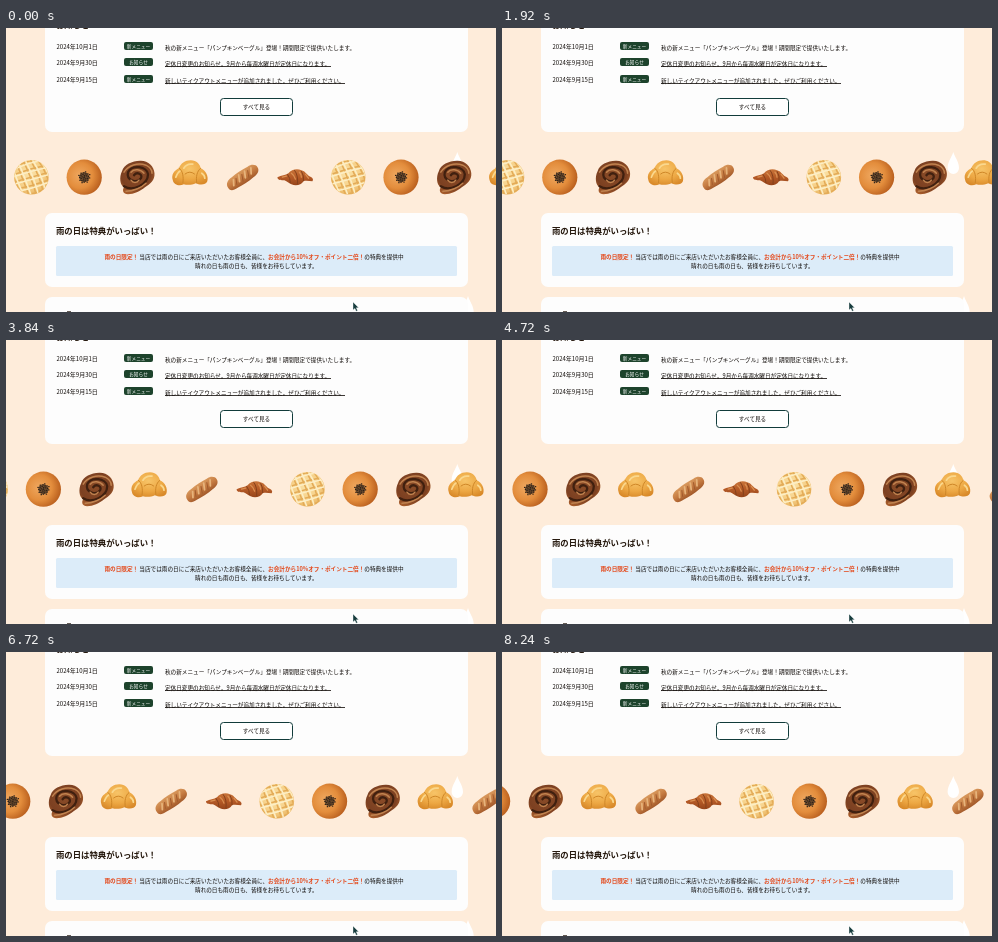
Recreate the animation shown at these times as an HTML page. Size 490 by 284 pixels, loop 8320 ms.

```html
<!DOCTYPE html>
<html lang="ja">
<head>
<meta charset="utf-8">
<title>Bakery</title>
<style>
html, body { margin: 0; width: 100%; height: 100%; overflow: hidden; background: #feecda; }
svg { display: block; width: 490px; height: 284px; }
text { font: 500 5.62px "Noto Sans CJK JP", "Noto Sans CJK", "Noto Sans", sans-serif; fill: #0d0805; white-space: pre; }
.date { font-size: 6px; }
.badge { font-size: 4.7px; fill: #fff; text-anchor: middle; }
.mid { text-anchor: middle; }
.title { font-size: 8.4px; font-weight: 700; fill: #24170c; }
.hot { fill: #e4481a; font-weight: 700; }
.card { fill: #fdfdfd; }
</style>
</head>
<body>
<svg viewBox="0 0 490 284">
  <defs>
    <radialGradient id="melonFill" cx=".45" cy=".4" r=".62">
      <stop offset="0" stop-color="#fbe3a8"/><stop offset=".65" stop-color="#f6d088"/><stop offset="1" stop-color="#e9b35f"/>
    </radialGradient>
    <radialGradient id="bunFill" cx=".38" cy=".45" r=".66">
      <stop offset="0" stop-color="#efa860"/><stop offset=".55" stop-color="#e38d3c"/><stop offset="1" stop-color="#b4591a"/>
    </radialGradient>
    <radialGradient id="rollFill" cx=".45" cy=".4" r=".62">
      <stop offset="0" stop-color="#8a4c28"/><stop offset=".7" stop-color="#7c4021"/><stop offset="1" stop-color="#a65c2b"/>
    </radialGradient>
    <radialGradient id="creamFill" cx=".48" cy=".35" r=".68">
      <stop offset="0" stop-color="#f7c468"/><stop offset=".6" stop-color="#eda844"/><stop offset="1" stop-color="#d98a2a"/>
    </radialGradient>
    <linearGradient id="loafFill" x2="0" y2="1">
      <stop offset="0" stop-color="#d99a5e"/><stop offset=".5" stop-color="#c67c42"/><stop offset="1" stop-color="#a2592a"/>
    </linearGradient>
    <linearGradient id="crustFill" x2="0" y2="1">
      <stop offset="0" stop-color="#c8743a"/><stop offset=".5" stop-color="#b55a26"/><stop offset="1" stop-color="#96451b"/>
    </linearGradient>
    <clipPath id="melonClip"><circle r="17"/></clipPath>
    <path id="drop" d="M0-11C1.5-6 5.7-1 5.7 5A5.7 6 0 0 1-5.7 5C-5.7-1-1.5-6 0-11Z" fill="#fff"/>

    <g id="bread0">
      <circle r="17.3" fill="url(#melonFill)"/>
      <g clip-path="url(#melonClip)" fill="none">
        <path id="melonLines" stroke="#e3ab57" stroke-width="1.5"/>
        <path id="melonShine" stroke="#fdeec4" stroke-width="1.6"/>
      </g>
    </g>
    <g id="bread1">
      <circle r="17.6" fill="url(#bunFill)"/>
      <circle r="5" fill="#6b4a2c"/>
      <path id="seeds" stroke="#2b2018" stroke-width="1.2" stroke-linecap="round"/>
    </g>
    <g id="bread2">
      <path d="M-15-6C-13-13-5-16 3-16.5C11-17 17-11 17.5-4C18 3 13 7 8 10C3 14-3 17-9 17C-14 17-15 13-13 10C-17 8-18 0-15-6Z" fill="url(#rollFill)"/>
      <g fill="none" stroke-linecap="round">
        <path d="M-13 9C-4 15 11 7 11-3C10-11-5-13-9-5C-11 3 0 7 4 1C6-3 0-6-3-2" stroke="#40200f" stroke-width="2.3"/>
        <path d="M-13-5C-9-12 1-15 9-12C13-10 15-7 15-4M-11 14C-3 14 5 10 9 6M-6-5C-3-9 4-8 7-4M-6 3C-4 6 0 6 2 3" stroke="#c1834f" stroke-width="1.5"/>
      </g>
    </g>
    <g id="bread3" transform="translate(0 -4)">
      <path d="M-17 7C-19 1-15-3-11-5C-9-10-5-13 1-13C7-13 10-9 11-5C16-3 19 3 17.5 8C16 12 10 12 6 10C2 12-3 12-6 11C-10 13-16 12-17 7Z" fill="url(#creamFill)"/>
      <path d="M-11-5C-7-3-6 4-7 10M11-5C7-2 6 4 7 10M-5 1Q0-3 5 1" fill="none" stroke="#cf8728" stroke-width="1"/>
      <path d="M-14 4Q-12-1-10-2M-6-5Q-3-10 3-9M12 0Q15 2 15 5" fill="none" stroke="#fad88e" stroke-width="1.7" stroke-linecap="round"/>
    </g>
    <g id="bread4" transform="rotate(-34)">
      <path d="M-18 1C-18-4-14-6-9-6C-3-7 4-6.5 10-6C15-6 18-3 18 0C18 4 14 6 9 6C3 7-4 6.5-10 6C-15 6-18 5-18 1Z" fill="url(#loafFill)"/>
      <path d="M-12 2L-9-3M-5 2L-2-4M2 2L5-4M9 2L12-3" stroke="#e6b37b" stroke-width="1.8" stroke-linecap="round"/>
      <path d="M-9 3L-6-3M-2 4L1-3M5 4L8-3" stroke="#a05a2c" stroke-width="1"/>
    </g>
    <g id="bread5">
      <path d="M-18 0C-14-2-10-2-7-4C-4-8 2-9 6-7C10-6 11-3 14-1C17 0 18.5 2 17 4C14 4 11 3 8 4C6 8 0 9-4 7C-7 6-8 4-11 3C-14 3-18 3-18 0Z" fill="url(#crustFill)"/>
      <path d="M-8-3Q-5 1-5 6M-1-7Q3-2 2 7M6-6Q9-1 8 4" fill="none" stroke="#84401b" stroke-width="1"/>
      <path d="M-13 0L-9-1M-4-4Q-1-2 0 2M4-5Q6-3 6 0M10-3L13 1" fill="none" stroke="#d98f52" stroke-width="1.3" stroke-linecap="round"/>
    </g>
  </defs>

  <rect width="490" height="284" fill="#feecda"/>
  <use href="#drop" x="451.3" y="135"/>
  <use href="#drop" x="462" y="279"/>

  <rect class="card" x="39" y="-20" width="423" height="124" rx="7"/>
  <text class="title" x="50" y="-.4">お知らせ</text>
  <g id="news"></g>
  <rect x="214.5" y="70.5" width="72" height="17" rx="3" fill="#fff" stroke="#123c3b"/>
  <text class="mid" x="250.5" y="80.8">すべて見る</text>

  <g id="belt"></g>

  <rect class="card" x="39" y="185" width="423" height="74" rx="7"/>
  <text class="title" x="50" y="206">雨の日は特典がいっぱい！</text>
  <rect x="50" y="218" width="401" height="30" rx="1.5" fill="#dcecf9"/>
  <text class="mid" x="248" y="230.5"><tspan class="hot">雨の日限定！</tspan> 当店では雨の日にご来店いただいたお客様全員に、<tspan class="hot">お会計から10%オフ・ポイント二倍！</tspan>の特典を提供中</text>
  <text class="mid" x="250.3" y="240.4">晴れの日も雨の日も、皆様をお待ちしています。</text>

  <rect class="card" x="39" y="269" width="423" height="40" rx="7"/>
  <path d="M61 283.6h4" stroke="#2d2016" stroke-width=".8"/>
  <path d="M347 274V282L348.9 280.4L350.2 283.3L351.6 282.7L350.3 279.8H352.7Z" fill="#173c3d" stroke="#fff" stroke-width=".4"/>
</svg>
<script>
const LOOP = 8320, STEP = 80, SPEED = 0.01063;
const PITCH = 52.8, KINDS = 6, COUNT = 12;
const byId = id => document.getElementById(id);

const news = [
  ["2024年10月1日", "新メニュー", "秋の新メニュー「パンプキンベーグル」登場！期間限定で提供いたします。", 0],
  ["2024年9月30日", "お知らせ", "定休日変更のお知らせ。9月から毎週水曜日が定休日になります。", 166],
  ["2024年9月15日", "新メニュー", "新しいテイクアウトメニューが追加されました。ぜひご利用ください。", 180]
];
byId("news").innerHTML = news.map(([date, tag, text, underline], i) => {
  const y = 18 + Math.floor(i * 16.5);
  return `<text class="date" x="50.5" y="${y + 3}">${date}</text>
    <rect x="118" y="${y - 4}" width="29" height="8" rx="2" fill="#1d432c"/>
    <text class="badge" x="132.5" y="${y + 1.7}">${tag}</text>
    <text x="159" y="${y + 3.5}">${text}</text>
    <path d="M159 ${y + 4.5}h${underline}" stroke="#0d0805" stroke-width=".8"/>`;
}).join("");

// Crossed score lines, bowed slightly toward the edges
const score = shift => [-15, -7.5, 0, 7.5, 15].map(v => {
  const p = v + shift, bow = p * 1.25;
  return `M${p - 9}-18Q${bow} 0 ${p + 5} 18M-18 ${p + 5}Q0 ${bow} 18 ${p - 5}`;
}).join("");
byId("melonLines").setAttribute("d", score(0));
byId("melonShine").setAttribute("d", score(2.2));

byId("seeds").setAttribute("d", Array.from({ length: 28 }, (_, i) => {
  const r = 1.15 * Math.sqrt(i), a = i * 2.4;
  return `M${(r * Math.cos(a)).toFixed(1)} ${(r * Math.sin(a)).toFixed(1)}h.4`;
}).join(""));

const belt = byId("belt");
belt.innerHTML = Array.from({ length: COUNT }, (_, i) => {
  const kind = i % KINDS;
  return `<g transform="translate(${25.4 + i * PITCH} 149.2)"><use href="#bread${kind}"/></g>`;
}).join("");

function draw(now) {
  const t = Math.floor((now % LOOP) / STEP) * STEP;
  belt.setAttribute("transform", `translate(${-t * SPEED} 0)`);
}

const start = performance.now();
function tick() {
  draw(performance.now() - start);
  requestAnimationFrame(tick);
}
draw(0);
requestAnimationFrame(tick);
</script>
</body>
</html>
```
